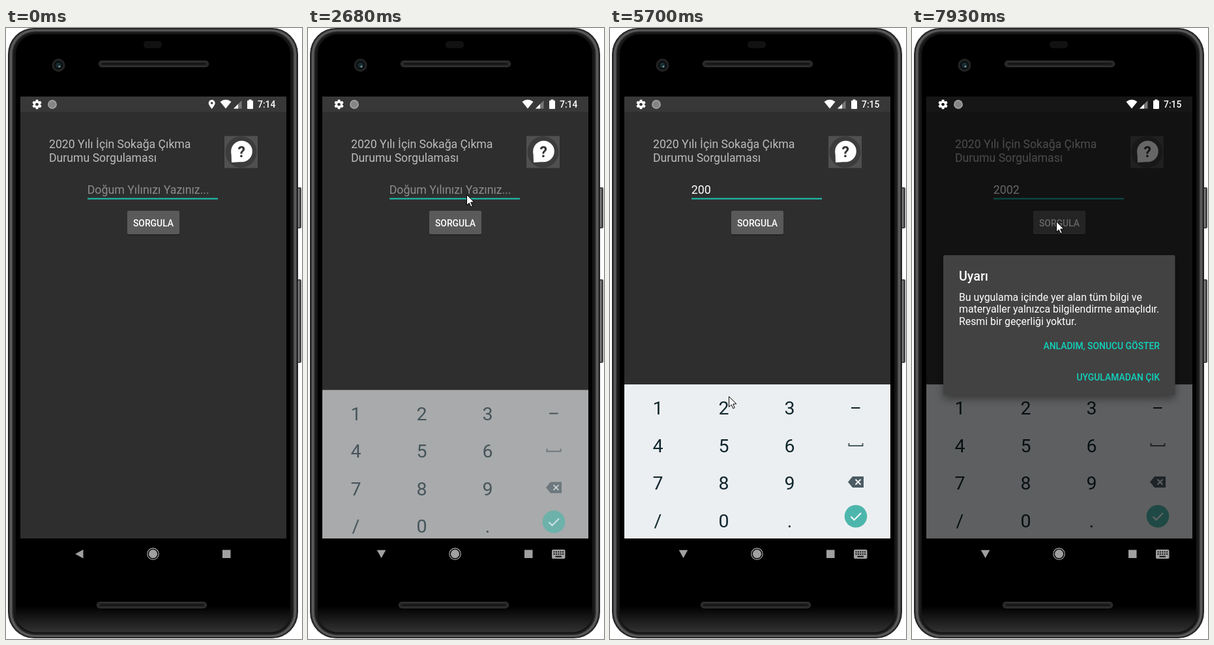
An HTML page with a canvas for the animation above (8 s loop, 454 by 936 pixels).

```html
<!DOCTYPE html>
<html lang="tr">
<head>
<meta charset="utf-8">
<title>Sokağa Çıkma Durumu</title>
<style>
  html, body { margin: 0; width: 100%; height: 100%; overflow: hidden; background: #fff; }
  canvas { display: block; width: 454px; height: 936px; }
</style>
</head>
<body>
<canvas id="stage" width="454" height="936"></canvas>
<script>
const ctx = document.getElementById('stage').getContext('2d');
const LOOP = 8000;
const TEAL = '#1cc8b5';
const SCREEN = { x: 22, y: 105, w: 408, h: 677 };
const KEYS_TOP = 546;
const PAD = { x: 73.5, y: 582, dx: 101, dy: 57.4 };

const YEAR = '2002';
const FOCUS = 70, TAP_FIELD = 2090, TAP_BUTTON = 7540;
const KEY_TIMES = [3830, 4700, 5080, 6080];
const INPUTS = [FOCUS, TAP_FIELD, ...KEY_TIMES, TAP_BUTTON];
const SHOW_KEYS = 2580, SHOW_DIALOG = 7600;

// Pointer stops: depart, arrive, x, y
const ROUTE = [
  [300, 300, 450, 925],
  [300, 1140, 304, 586],
  [1140, 1990, 243, 255],
  [2830, 3600, 188, 577],
  [3920, 4550, 179, 748],
  [5240, 5700, 182, 564],
  [6460, 6900, 244, 420],
  [6900, 7310, 221, 296]
];

const clamp = v => Math.min(1, Math.max(0, v));
const progress = (t, a, b) => clamp((t - a) / (b - a));
const smooth = u => u * u * (3 - 2 * u);
const easeOut = u => 1 - (1 - u) ** 2;
const mix = (a, b, u) => a + (b - a) * u;

function rect(x, y, w, h, fill, r = 0) {
  ctx.fillStyle = fill;
  ctx.beginPath();
  ctx.roundRect(x, y, w, h, r);
  ctx.fill();
}
function disc(x, y, r, fill) {
  ctx.fillStyle = fill;
  ctx.beginPath();
  ctx.arc(x, y, r, 0, 7);
  ctx.fill();
}
function ring(x, y, r, color, width) {
  ctx.strokeStyle = color;
  ctx.lineWidth = width;
  ctx.beginPath();
  ctx.arc(x, y, r, 0, 7);
  ctx.stroke();
}
function poly(points, fill) {
  ctx.fillStyle = fill;
  ctx.beginPath();
  points.forEach(([x, y]) => ctx.lineTo(x, y));
  ctx.closePath();
  ctx.fill();
}
function line(points, color, width) {
  ctx.strokeStyle = color;
  ctx.lineWidth = width;
  ctx.beginPath();
  points.forEach(([x, y]) => ctx.lineTo(x, y));
  ctx.stroke();
}
function text(str, x, y, size, fill, weight = 400, align = 'left') {
  ctx.font = `${weight} ${size}px Roboto, sans-serif`;
  ctx.textAlign = align;
  ctx.fillStyle = fill;
  ctx.fillText(str, x, y);
}
function lines(rows, x, y, step, size, fill) {
  rows.forEach((row, i) => text(row, x, y + i * step, size, fill));
}
function faded(alpha, draw) {
  if (alpha <= 0) return;
  ctx.save();
  ctx.globalAlpha = alpha;
  draw();
  ctx.restore();
}

function speaker(x, y) {
  rect(x, y, 169, 10, '#3b3b3b', 5);
  rect(x + 1, y + 1, 167, 8, '#262626', 4);
  rect(x + 5, y + 4, 159, 2, '#101010', 1);
}

function sideButton(y, h) {
  rect(446, y, 7, h, '#444', 2);
  rect(448, y + 2, 2, h - 4, '#808080');
}

function phone() {
  rect(0, 0, 454, 936, '#fff');
  sideButton(244, 63);
  sideButton(385, 128);
  // Rounded metal rim, brightest part-way in
  for (let i = 0; i <= 12; i++) {
    const shade = i < 12 ? 22 + 75 * Math.exp(-(((i - 4) / 2.5) ** 2)) : 0;
    rect(3 + i, i * .8, 445 - 2 * i, 935 - 1.6 * i, `rgb(${shade},${shade},${shade})`, 40 - i * .8);
  }
  const sheen = ctx.createLinearGradient(0, 885, 0, 926);
  sheen.addColorStop(0, 'rgba(255,255,255,0)');
  sheen.addColorStop(1, 'rgba(255,255,255,.2)');
  rect(15, 840, 421, 85.4, sheen, [0, 0, 30, 30]);
  speaker(142, 50);
  speaker(139, 879);

  rect(211, 20, 28, 11, '#111', 5);
  disc(80.5, 57, 10, '#242424');
  disc(80.5, 57, 7, '#0b1013');
  disc(80.5, 57, 4, '#1b2c30');
  disc(82, 59, 1.6, '#6d9994');
}

function gear(x, y) {
  ctx.save();
  ctx.translate(x, y);
  for (let i = 0; i < 6; i++) {
    ctx.rotate(Math.PI / 3);
    rect(-2, -7.3, 4, 5, '#fff', 1);
  }
  ctx.restore();
  ring(x, y, 4.1, '#fff', 3);
}

function locationPin(x, y) {
  ctx.fillStyle = '#fff';
  ctx.beginPath();
  ctx.arc(x, y, 5, Math.PI * .85, Math.PI * .15);
  ctx.quadraticCurveTo(x + 3.3, y + 5, x, y + 9);
  ctx.quadraticCurveTo(x - 3.3, y + 5, x - 4.7, y + 2);
  ctx.fill();
  disc(x, y, 1.8, '#383838');
}

function wifi(x, y) {
  ctx.fillStyle = '#fff';
  ctx.beginPath();
  ctx.moveTo(x, y);
  ctx.lineTo(x - 8.5, y - 10.5);
  ctx.quadraticCurveTo(x, y - 17, x + 8.5, y - 10.5);
  ctx.fill();
}

function signal(x, y) {
  const wedge = (size, fill) => poly([[x, y], [x + size, y], [x + size, y - size]], fill);
  wedge(12.5, '#777');
  wedge(7, '#fff');
}

function statusIcons(t) {
  gear(47.5, 117);
  disc(71, 117, 6.8, '#858585');
  ring(71, 117, 6, '#a6a6a6', 1.4);
  if (t < 750) locationPin(315.7, 115);
  wifi(337, 123.5);
  signal(349, 123.5);
  rect(370, 111, 9, 13, '#fff', 1);
  rect(372.5, 109.5, 4, 2, '#fff');
  text(t < 4400 ? '7:14' : '7:15', 386, 122, 13.9, '#fff', 500);
}

function helpImage() {
  rect(335, 165.5, 51, 49, '#505050');
  disc(360.5, 190, 24, '#3c3c3c');
  disc(361.5, 189, 16.3, '#fff');
  poly([[345.5, 189], [346, 206], [362, 205]], '#fff');
  text('?', 361.3, 197.5, 23, '#333', 700, 'center');
}

function caretVisible(t) {
  if (t < FOCUS || t > SHOW_DIALOG + 80) return false;
  const last = INPUTS.filter(at => at <= t).pop();
  return (t - last) % 1000 < 500;
}

function app(t) {
  const grey = 'rgba(255,255,255,.68)';
  rect(SCREEN.x, SCREEN.y, SCREEN.w, SCREEN.h, '#2e2e2e');
  rect(SCREEN.x, SCREEN.y, SCREEN.w, 23.5, '#383838');
  lines(['2020 Yılı İçin Sokağa Çıkma', 'Durumu Sorgulaması'], 66, 183.5, 21, 17.67, grey);
  helpImage();

  const typed = YEAR.slice(0, KEY_TIMES.filter(at => t >= at).length);
  text(typed || 'Doğum Yılınızı Yazınız...', 124.7, 253.5, 17.75, typed ? '#fff' : '#8c8c8c');
  rect(125, 260.5, 200, 2, TEAL);
  if (caretVisible(t)) rect(124.7 + typed.length * 10, 235, 2, 23.5, TEAL);

  const pressed = t >= TAP_BUTTON && t < SHOW_DIALOG + 100;
  rect(186, 281, 80, 36.5, 'rgba(0,0,0,.3)', 2);
  rect(186, 280, 80, 36, pressed ? '#6e6e6e' : '#5a5a5a', 2);
  text('SORGULA', 226, 303.5, 13.9, '#fff', 500, 'center');

  if (t >= SHOW_DIALOG) {
    lines(['20 yaşından küçük olduğunuzdan ve', 'şuan saat 13 ile 16 arası olmadığından',
      'dışarıya ÇIKAMAZSINIZ.'], 73.5, 366.5, 20.9, 17.75, grey);
  }
}

function keyIcons() {
  const ink = '#4b5b63', x = 377;
  rect(x - 7, 581, 13.5, 2, '#10262e');
  line([[x - 10.5, 636], [x - 10.5, 640], [x + 10.5, 640], [x + 10.5, 636]], ink, 2);
  poly([[x - 12, 695.5], [x - 5, 687], [x + 12, 687], [x + 12, 704], [x - 5, 704]], ink);
  for (const s of [-4, 4]) line([[x - 1.5, 695.5 - s], [x + 6.5, 695.5 + s]].map(
    ([a, b]) => [a + 1, b]), '#eceff1', 2);
  disc(x, 748, 17.3, '#4db6ac');
  line([[x - 7.5, 748.5], [x - 2.5, 753.5], [x + 8, 743]], '#fff', 2);
}

function keyboard(t) {
  const shown = easeOut(progress(t, SHOW_KEYS, SHOW_KEYS + 250));
  faded(shown, () => {
    ctx.beginPath();
    ctx.rect(SCREEN.x, KEYS_TOP, SCREEN.w, 236);
    ctx.clip();
    ctx.translate(0, (1 - shown) * 24);
    rect(SCREEN.x, KEYS_TOP, SCREEN.w, 236, '#eceff1');
    if (KEY_TIMES.some(at => t >= at - 75 && t < at)) {
      const [x, y] = pointerAt(t);
      disc(x, y, 32, 'rgba(0,0,0,.07)');
    }
    [...'123456789/0.'].forEach((key, i) => {
      const x = PAD.x + (i % 3) * PAD.dx;
      const y = PAD.y + Math.floor(i / 3) * PAD.dy;
      text(key, x, y + 10.3, 28.5, '#10262e', 400, 'center');
    });
    keyIcons();
  });
}

function dialogCard() {
  ctx.save();
  ctx.shadowColor = 'rgba(0,0,0,.4)';
  ctx.shadowBlur = 13;
  ctx.shadowOffsetY = 6;
  rect(48, 348, 355.5, 214, '#424242', 2);
  ctx.restore();
  text('Uyarı', 72, 386.5, 19.7, '#fff', 500);
  lines(['Bu uygulama içinde yer alan tüm bilgi ve',
    'materyaller yalnızca bilgilendirme amaçlıdır.',
    'Resmi bir geçerliği yoktur.'], 72, 417.7, 18.5, 15.83, '#fff');
  ['ANLADIM, SONUCU GÖSTER', 'UYGULAMADAN ÇIK'].forEach((label, i) =>
    text(label, 380, 492.3 + i * 47.5, 13.9, '#10d3bd', 500, 'right'));
}

function navBar(open) {
  const grey = '#a0a0a0';
  ctx.save();
  ctx.translate(112.5, 805.7);
  if (open) ctx.rotate(-Math.PI / 2);
  poly([[-6.3, 0], [6, -6.8], [6, 6.8]], grey);
  ctx.restore();
  disc(225.5, 805.7, 6.6, grey);
  ring(225.5, 805.7, 8.7, grey, 1.3);
  rect(332, 799.5, 12.5, 12.5, grey);
  if (!open) return;
  rect(374, 799, 20.5, 14, grey, 2);
  for (let i = 0; i < 10; i++) {
    rect(376.5 + (i % 5) * 3.4, 801.5 + Math.floor(i / 5) * 3.4, 2, 2, '#111');
  }
  rect(379.5, 808.7, 9.5, 2, '#111');
}

function pointerAt(t) {
  const next = ROUTE.findLastIndex(([depart]) => t >= depart);
  const [depart, arrive, x, y] = ROUTE[next];
  const [, , fromX, fromY] = ROUTE[Math.max(0, next - 1)];
  const u = smooth(progress(t, depart, arrive));
  return [mix(fromX, x, u), mix(fromY, y, u)];
}

function pointer(t) {
  if (t < ROUTE[0][0]) return;
  const [x, y] = pointerAt(t).map(Math.round);
  const arrow = [[0, 0], [0, 16], [3.7, 12.6], [6.3, 18.3], [8.7, 17.2], [6.2, 11.6], [11.3, 11.3], [0, 0]];
  ctx.save();
  ctx.translate(x + .5, y + .5);
  poly(arrow, '#fff');
  line(arrow, '#000', 1);
  ctx.restore();
}

function draw(t) {
  const opening = progress(t, SHOW_DIALOG + 30, SHOW_DIALOG + 165);
  phone();
  app(t);
  keyboard(t);
  rect(SCREEN.x, SCREEN.y, SCREEN.w, SCREEN.h, `rgba(0,0,0,${.6 * opening})`);
  statusIcons(t);
  if (t >= SHOW_DIALOG) faded(mix(.2, 1, opening), dialogCard);
  navBar(t >= SHOW_KEYS - 130);
  pointer(t);
}

const start = performance.now();
function tick() {
  draw((performance.now() - start) % LOOP);
  requestAnimationFrame(tick);
}
tick();
</script>
</body>
</html>
```
